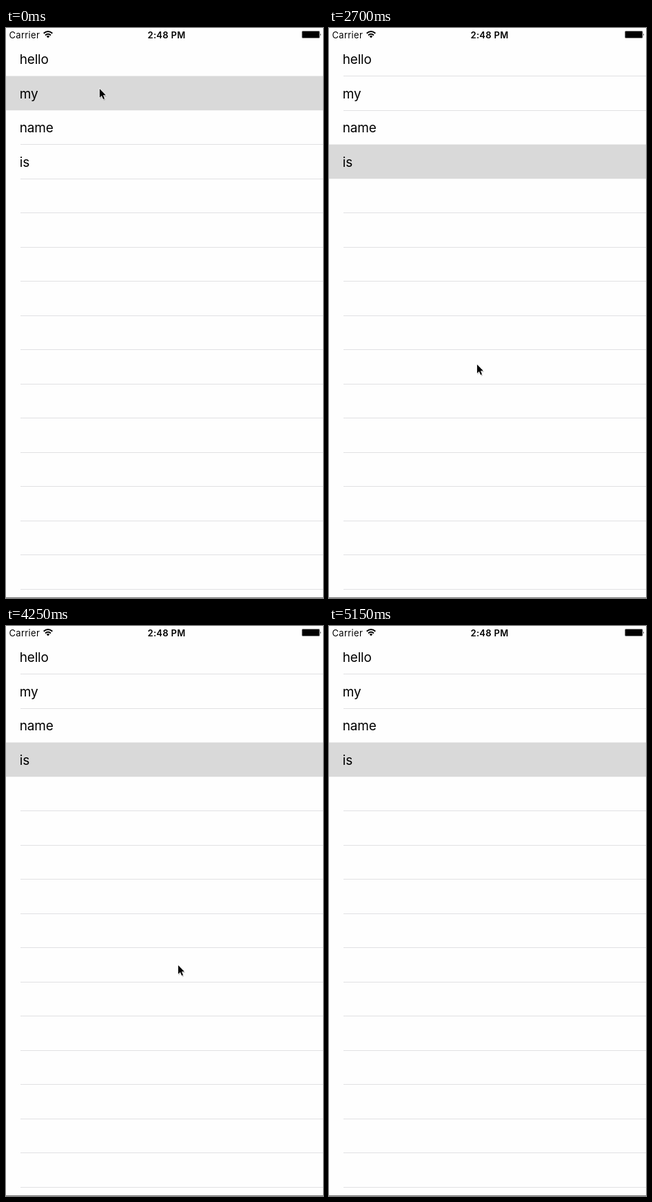
These frames come from a looping animation (460 px wide and 825 px high, 5.3 s). An HTML page:

```html
<!DOCTYPE html>
<html lang="en">
<head>
<meta charset="utf-8">
<title>Table selection and bounce</title>
<style>
  html, body { margin: 0; width: 100%; height: 100%; overflow: hidden; background: #fefefe; }
  svg { display: block; width: 100vw; height: 100vh; }
  text { font-family: Inter, "Open Sans", sans-serif; fill: #000; }
  .label { font-size: 19px; letter-spacing: -0.2px; }
  .status { font-size: 13px; letter-spacing: 0.3px; }
  .clock { font-weight: 600; text-anchor: middle; }
</style>
</head>
<body>
<svg viewBox="0 0 460 825">
  <rect width="460" height="825" fill="#fefefe"/>
  <rect id="highlight" width="460" fill="#d9d9d9"/>
  <g id="lines" fill="#e1e1e3"></g>
  <g id="labels"></g>

  <text class="status" x="4.5" y="14.5">Carrier</text>
  <g fill="none" stroke="#000" stroke-width="2">
    <path d="M54.7 7.8 Q61 2.3 67.3 7.8"/>
    <path d="M57 10.6 Q61 7 65 10.6"/>
  </g>
  <path d="M58.7 12 Q61 10.2 63.3 12 L61 14.6 Z"/>
  <text class="status clock" x="233" y="14.5">2:48 PM</text>
  <rect x="429.6" y="4.5" width="25.4" height="10" rx="1.2" stroke="#888" stroke-width="0.8"/>
  <path d="M456 7.7 Q457.6 9.5 456 11.4 Z"/>

  <g id="cursor">
    <path d="M1.4 2.2 V15.8 L4.5 13 L6.8 18 L9.3 17 L7.2 12 H11.2 Z" fill="#000" opacity="0.2"/>
    <path d="M0.9 1 V13.8 L3.9 11 L6.1 16 L8 15.2 L5.9 10.3 H9.9 Z"
          stroke="#fff" stroke-width="1.2" paint-order="stroke"/>
  </g>
  <rect y="824" width="460" height="1" fill="#777"/>
</svg>
<script>
const LOOP = 5300, STEP = 150;
const WORDS = ["hello", "my", "name", "is"];
const FIRST_LINE = 69.15, PITCH = 49.52, LINES = 17;
const SPRING = 2.53 / STEP;

// Resting points of the pointer; it eases from one to the next.
const STOPS = [
  { t: 300, x: 135, y: 87 },
  { t: 1350, x: 136, y: 153 },
  { t: 1650, x: 138, y: 207 },
  { t: 2250, x: 138, y: 207 },
  { t: 2700, x: 214, y: 486 },
  { t: 2850, x: 226, y: 677 },
  { t: 3450, x: 241, y: 154 },
  { t: 3750, x: 244, y: 22 },
  { t: 4250, x: 249, y: 490 },
  { t: 4550, x: 249, y: 561 }
];

const smooth = p => p * p * (3 - 2 * p);
const flick = p => p ** 4;
const PULLS = [
  { start: 3000, release: 3300, peak: -224.7, ease: flick },
  { start: 4250, release: 4700, peak: 62.7, ease: smooth }
];

const byId = id => document.getElementById(id);
const highlight = byId("highlight"), cursor = byId("cursor");

function add(parent, tag, attrs) {
  const el = document.createElementNS("http://www.w3.org/2000/svg", tag);
  for (const key in attrs) el.setAttribute(key, attrs[key]);
  return parent.appendChild(el);
}

const lines = Array.from({ length: LINES }, () =>
  add(byId("lines"), "rect", { x: 21, width: 439, height: 1 }));
const labels = WORDS.map(word => {
  const el = add(byId("labels"), "text", { class: "label", x: 19.8 });
  el.textContent = word;
  return el;
});

function pointerAt(t) {
  const next = STOPS.findIndex(stop => stop.t > t);
  if (next === 0) return STOPS[0];
  if (next < 0) return STOPS[STOPS.length - 1];
  const a = STOPS[next - 1], b = STOPS[next];
  const p = smooth((t - a.t) / (b.t - a.t));
  return { x: a.x + (b.x - a.x) * p, y: a.y + (b.y - a.y) * p };
}

// Follow the finger, then settle with a critically damped spring.
function pulled({ start, release, peak, ease }, t) {
  if (t <= start) return 0;
  if (t <= release) return peak * ease((t - start) / (release - start));
  const s = (t - release) * SPRING;
  const offset = peak * (1 + s) * Math.exp(-s);
  return Math.abs(offset) < 0.5 ? 0 : offset;
}

// The screen refreshes in steps, with a short stall before the second pull.
function tick(t) {
  if (t >= 4250) return 4250 + Math.floor((t - 4250) / STEP) * STEP;
  if (t >= 4080) return 4080;
  return Math.min(3900, Math.floor(t / STEP) * STEP);
}

function draw(time) {
  const t = tick(time);
  const offset = PULLS.reduce((sum, pull) => sum + pulled(pull, t), 0);
  const edge = i => FIRST_LINE + PITCH * i + offset;
  const selected = t < 1200 ? 1 : t < 2100 ? 2 : 3;
  const bare = t >= 3300 && t < 3900;

  highlight.setAttribute("y", edge(selected - 1) + 0.35);
  highlight.setAttribute("height", PITCH + 0.2);
  lines.forEach((line, i) => {
    const covered = i === selected || i === selected - 1;
    line.setAttribute("y", Math.round(edge(i)));
    line.setAttribute("visibility", bare || covered ? "hidden" : "visible");
  });
  labels.forEach((label, i) => label.setAttribute("y", Math.round(edge(i)) - 17));

  const { x, y } = pointerAt(t);
  cursor.setAttribute("transform", `translate(${Math.round(x)} ${Math.round(y)})`);
  cursor.setAttribute("visibility", t >= 5150 ? "hidden" : "visible");
}

const start = performance.now();
function frame() {
  draw((performance.now() - start) % LOOP);
  requestAnimationFrame(frame);
}
frame();
</script>
</body>
</html>
```
